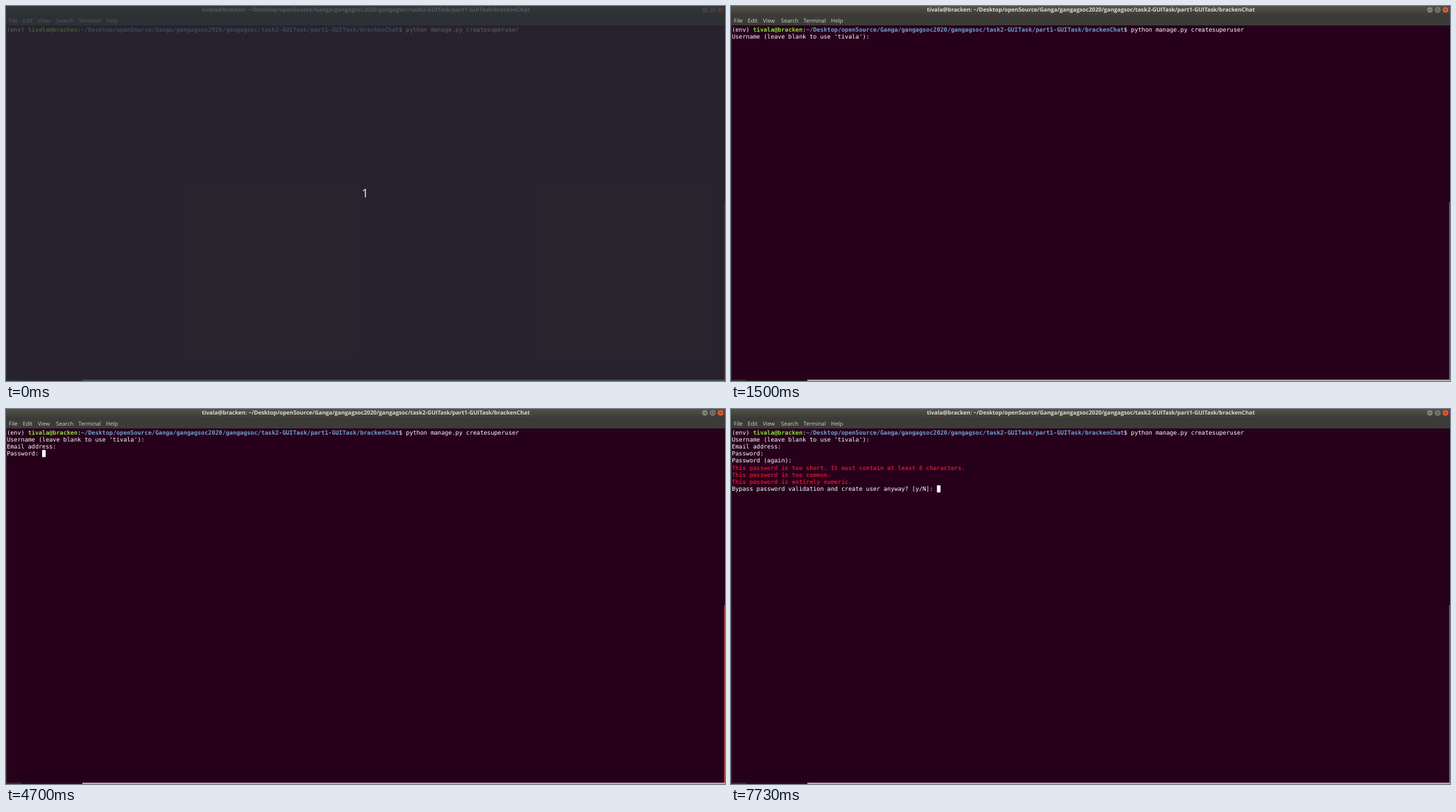
An HTML page for the animation above (8 s loop, 1036 by 541 pixels).

```html
<!DOCTYPE html>
<html lang="en">
<head>
<meta charset="utf-8">
<title>Terminal</title>
<style>
html, body { margin: 0; width: 100%; height: 100%; overflow: hidden; background: #27011c; }
svg { display: block; width: 1036px; height: 541px; }
text { white-space: pre; text-rendering: geometricPrecision; }
.mono { font: 8.466px "DejaVu Sans Mono", monospace; fill: #fff; }
.ui { font: 8px "Open Sans", "Noto Sans", sans-serif; fill: #d3d0c8; }
.title { font: 700 8.08px "Open Sans", "Noto Sans", sans-serif; fill: #dfdbd2; text-anchor: middle; }
.bold { font-weight: 700; }
.user { fill: #8ae234; }
.path { fill: #729fcf; }
.error { fill: #d0142c; font-weight: 700; }
</style>
</head>
<body>
<svg id="stage" viewBox="0 0 1036 541">
  <defs>
    <linearGradient id="bar" x1="0" y1="0" x2="0" y2="1">
      <stop offset="0" stop-color="#54524a"/>
      <stop offset="1" stop-color="#3c3b37"/>
    </linearGradient>
  </defs>
  <rect width="1036" height="541" fill="#27011c"/>
  <rect width="1036" height="28" fill="#3c3b37"/>
  <rect width="1036" height="13" fill="url(#bar)"/>
  <rect y="28" width="0.7" height="511" fill="#4a3f45"/>
  <rect x="1034.8" y="283" width="1.2" height="256" fill="#b5533c"/>
  <rect y="539" width="110" height="2" fill="#1c1518"/>
  <rect y="539" width="22" height="2" fill="#2f2f2b"/>
  <rect x="110" y="539" width="926" height="2" fill="#b0aba9"/>
  <text id="title" class="title" x="518.5" y="8.4"></text>
  <g id="menu" class="ui"></g>
  <g fill="#85837b" stroke="#33322e" stroke-width="0.6">
    <circle cx="1007" cy="5.5" r="4.5"/>
    <circle cx="1018.3" cy="5.5" r="4.5"/>
    <circle cx="1029.6" cy="5.5" r="4.5" fill="#ec5a36"/>
  </g>
  <path d="M1005 5.7h4M1016.6 3.9h3.4v3.3h-3.4zM1028 3.9l3.2 3.2m0-3.2l-3.2 3.2" fill="none" stroke="#3c3b37" stroke-width="0.8"/>
  <g id="lines" class="mono"></g>
  <rect id="cursor" width="5.1" height="10.2" fill="#fff"/>
  <g id="countdown">
    <rect width="1036" height="541" fill="#292e34" fill-opacity="0.75"/>
    <text x="517.3" y="276.3" text-anchor="middle" font-size="17" font-family="Noto Sans, sans-serif" fill="#e2e3e5">1</text>
  </g>
</svg>
<script>
const LOOP = 8000, CELL = 5.097, ROW = 10.194, LEFT = 1.2, TOP = 28.6;
const USER = "tivala", HOST = "bracken";
const PATH = `~/Desktop/openSource/Ganga/gangagsoc2020/gangagsoc/task2-GUITask/part1-GUITask/${HOST}Chat`;
const byId = id => document.getElementById(id);

function add(parent, tag, attrs, content = "") {
  const el = document.createElementNS("http://www.w3.org/2000/svg", tag);
  for (const key in attrs) el.setAttribute(key, attrs[key]);
  el.textContent = content;
  return parent.appendChild(el);
}

byId("title").textContent = `${USER}@${HOST}: ${PATH}`;
const menu = { File: 4, Edit: 24, View: 46, Search: 72, Terminal: 104.3, Help: 144 };
for (const name in menu) add(byId("menu"), "text", { x: menu[name], y: 24.3 }, name);

// Each line: the time it appears, then its [text, class] runs.
const lines = [
  [0, ["(env) ", ""], [`${USER}@${HOST}`, "bold user"], [":", ""], [PATH, "bold path"],
    ["$ python manage.py createsuperuser", ""]],
  [1500, [`Username (leave blank to use '${USER}'): `, ""]],
  [2630, ["Email address: ", ""]],
  [3730, ["Password: ", ""]],
  [5500, ["Password (again): ", ""]],
  [6670, ["This password is too short. It must contain at least 8 characters.", "error"]],
  [6670, ["This password is too common.", "error"]],
  [6670, ["This password is entirely numeric.", "error"]],
  [6670, ["Bypass password validation and create user anyway? [y/N]: ", ""]]
].map(([start, ...runs], row) => {
  const el = add(byId("lines"), "text", { x: LEFT, y: TOP + 8.1 + row * ROW });
  for (const [content, style] of runs) add(el, "tspan", { class: style }, content);
  return { start, el };
});

// Cursor states: time, column, row; a bare time hides it.
const cursorSteps = [
  [0], [570, 145, 0], [800, 0, 1], [1500], [1970, 40, 1], [2570, 0, 2], [2630, 15, 2],
  [3170], [3700, 15, 2], [3730, 10, 3], [4300], [4700, 10, 3], [5500, 18, 4],
  [6600, 0, 5], [6670, 58, 8], [7170], [7730, 58, 8]
];

const show = (el, on) => el.setAttribute("visibility", on ? "visible" : "hidden");

function render(t) {
  show(byId("countdown"), t < 30);
  for (const { start, el } of lines) show(el, t >= start);
  const [, col, row] = cursorSteps.findLast(step => t >= step[0]);
  const cursor = byId("cursor");
  show(cursor, col !== undefined);
  if (col !== undefined) {
    cursor.setAttribute("x", LEFT - 0.1 + col * CELL);
    cursor.setAttribute("y", TOP + row * ROW);
  }
}

const origin = performance.now();
function tick() {
  render((performance.now() - origin) % LOOP);
  requestAnimationFrame(tick);
}
render(0);
requestAnimationFrame(tick);
</script>
</body>
</html>
```
